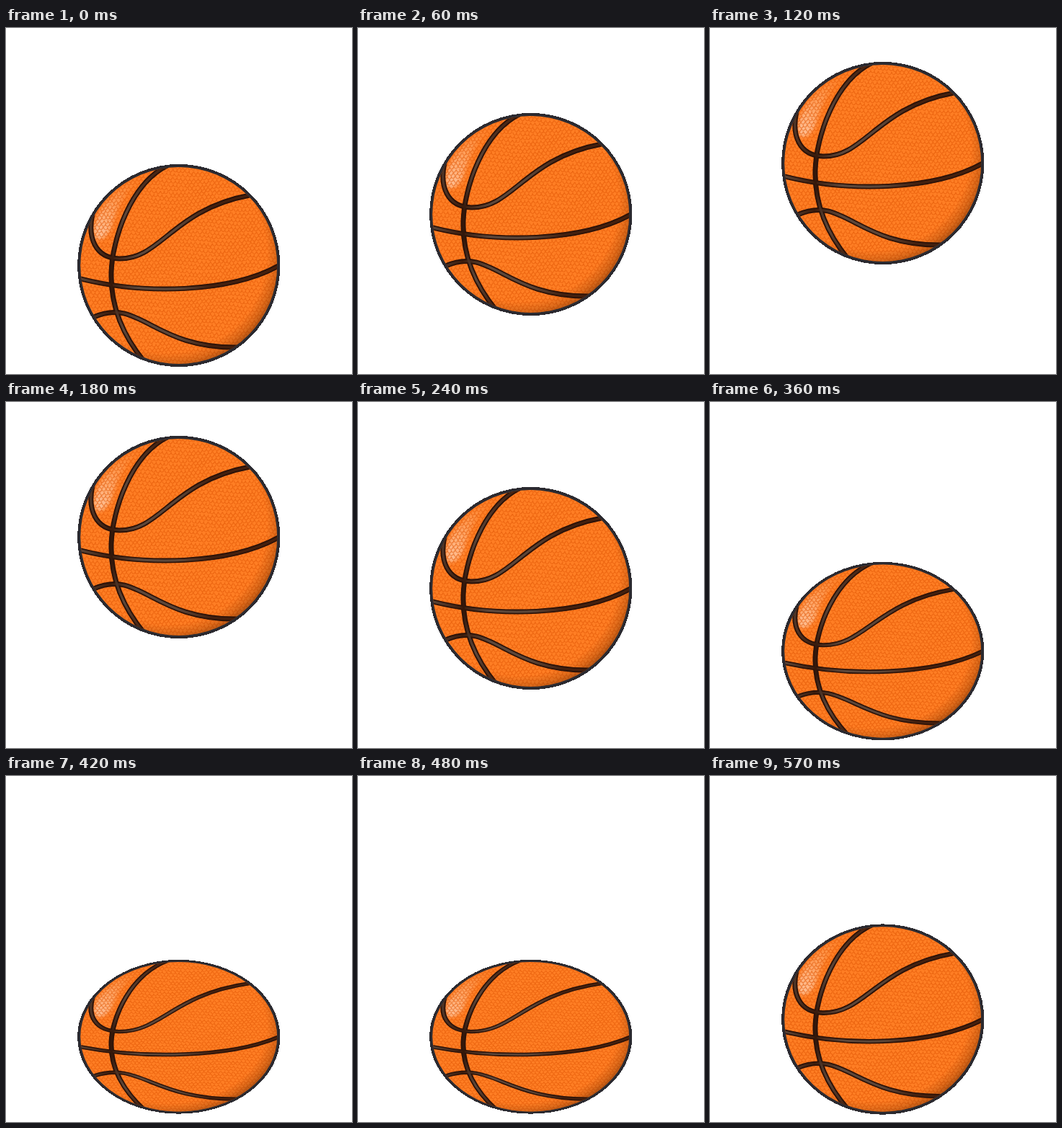
Animation, 480 px wide and 480 px high, one loop 600 ms. Source, as an HTML page:

```html
<!DOCTYPE html>
<html lang="en">
<head>
<meta charset="utf-8">
<title>Bouncing ball</title>
<style>
  html, body { margin: 0; width: 100%; height: 100%; overflow: hidden; background: #fff; }
  svg { display: block; width: 100%; height: 100%; }
</style>
</head>
<body>
<svg viewBox="0 0 480 480">
  <defs>
    <clipPath id="disc"><circle cx="239.7" cy="329.5" r="136.4"/></clipPath>
    <filter id="soft"><feGaussianBlur stdDeviation="2.5"/></filter>
    <radialGradient id="shade" gradientUnits="userSpaceOnUse" cx="224" cy="313" r="164">
      <stop offset=".84" stop-color="#6b2c00" stop-opacity="0"/>
      <stop offset=".92" stop-color="#6b2c00" stop-opacity=".22"/>
      <stop offset="1" stop-color="#4a2208" stop-opacity=".55"/>
    </radialGradient>
    <linearGradient id="gloss" gradientUnits="userSpaceOnUse" x1="124" y1="274" x2="176" y2="226">
      <stop offset="0" stop-color="#ffcfb0" stop-opacity=".75"/>
      <stop offset="1" stop-color="#ffc598" stop-opacity=".15"/>
    </linearGradient>
    <linearGradient id="acrossSheen" gradientUnits="userSpaceOnUse" x1="100" y1="0" x2="380" y2="0">
      <stop offset="0" stop-color="#5c483c"/>
      <stop offset=".16" stop-color="#3c1c0c"/>
      <stop offset=".3" stop-color="#5c483c"/>
      <stop offset=".5" stop-color="#5a4538"/>
      <stop offset=".66" stop-color="#43200f"/>
      <stop offset="1" stop-color="#46200d"/>
    </linearGradient>
    <linearGradient id="downSheen" gradientUnits="userSpaceOnUse" x1="0" y1="190" x2="0" y2="460">
      <stop offset="0" stop-color="#43200f"/>
      <stop offset=".25" stop-color="#5c483c"/>
      <stop offset=".5" stop-color="#34180b"/>
      <stop offset=".65" stop-color="#34180b"/>
      <stop offset=".85" stop-color="#5c483c"/>
      <stop offset="1" stop-color="#43200f"/>
    </linearGradient>
    <path id="down" d="M230 188C172 212 147 296 146 340C145 386 163 428 192 463"/>
    <path id="across" d="M120 258C113 290 123 319 157 320C215 321 231 252 338 232
      M102 347.5C190 370 310 368 379 329.5
      M122 401C186 373 203 445 322 443"/>
  </defs>
  <g id="ball">
    <circle cx="239.7" cy="329.5" r="140.6" fill="#2b2a30" shape-rendering="crispEdges"/>
    <g clip-path="url(#disc)" fill="none">
      <circle cx="239.7" cy="329.5" r="139" fill="#ff7e24"/>
      <path d="M183 209C150 225 124 255 122 280C121 300 137 296 146 278C152 252 165 230 183 209" fill="url(#gloss)" filter="url(#soft)"/>
      <path id="grain" stroke="#e25a08" stroke-opacity=".62" stroke-width="1.1"/>
      <circle cx="239.7" cy="329.5" r="139" fill="url(#shade)"/>
      <g stroke="#2c1208" stroke-width="7">
        <use href="#across"/>
        <use href="#down"/>
      </g>
      <g stroke-width="3.2">
        <use href="#across" stroke="url(#acrossSheen)"/>
        <use href="#down" stroke="url(#downSheen)"/>
      </g>
    </g>
  </g>
</svg>
<script>
const FLOOR = 464, STEP = 30, LOOP = 600;
const ball = document.getElementById('ball');

// Leather: wavy rows of small jittered scallops
let seed = 7;
const jitter = n => {
  seed = (seed * 16807) % 2147483647;
  return (seed / 2147483647 - .5) * n;
};
let d = '';
for (let row = 0; row < 60; row++) {
  for (let col = 0; col < 50; col++) {
    const x = 98 + (col + row % 2 / 2) * 5.8 + jitter(1.6);
    const y = 187 + row * 4.8 + Math.sin(x / 19 + row / 5) * 2 + jitter(1.4);
    d += `M${x.toFixed(1)} ${y.toFixed(1)}q.4 3.8 2.8 3.6t2.8-3.6`;
  }
}
document.getElementById('grain').setAttribute('d', d);

// First half: up and down; second half: squash and recover
function draw() {
  const t = Math.floor(performance.now() % LOOP / STEP) * STEP;
  const amount = 1 - Math.abs(t % 300 - 150) / 150;
  ball.setAttribute('transform', t < 300
    ? `translate(0 ${-177.5 * amount})`
    : `translate(0 ${FLOOR}) scale(1 ${1 - .3 * amount}) translate(0 ${-FLOOR})`);
  requestAnimationFrame(draw);
}
draw();
</script>
</body>
</html>
```
